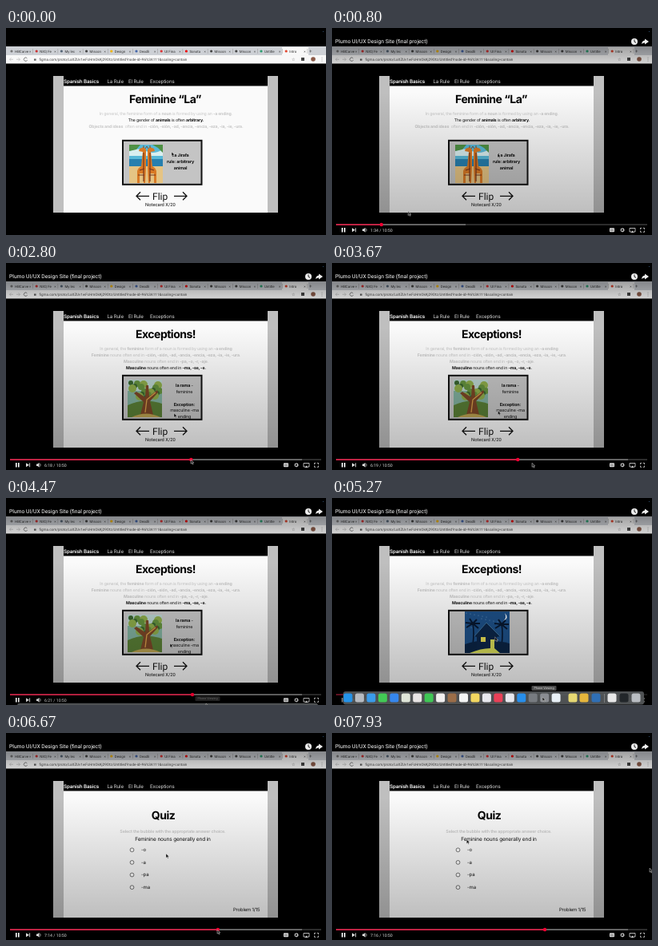
Recreate the animation shown at these times as an HTML page. Size 400 by 259 pixels, loop 8000 ms.

```html
<!DOCTYPE html>
<html lang="en">
<head>
<meta charset="utf-8">
<title>Design site walkthrough</title>
<style>
  html, body { margin: 0; width: 100%; height: 100%; overflow: hidden; background: #000; }
  svg { display: block; width: 100vw; height: 100vh; }
  text { font-family: Inter, sans-serif; text-rendering: geometricPrecision; white-space: pre; }
  .ui { font-family: Roboto, sans-serif; }
</style>
</head>
<body>
<svg id="stage" viewBox="0 0 400 259" preserveAspectRatio="none"></svg>
<script>
(() => {
const LOOP = 8000, DURATION = 650, BAR_X = 5, BAR_W = 389;

// ---- markup helpers ----
const rect = (x, y, w, h, fill, extra = '') =>
  `<rect x="${x}" y="${y}" width="${w}" height="${h}" fill="${fill}" ${extra}/>`;
const dot = (x, y, r, fill, extra = '') => `<circle cx="${x}" cy="${y}" r="${r}" fill="${fill}" ${extra}/>`;
const path = (d, fill, extra = '') => `<path d="${d}" fill="${fill}" ${extra}/>`;
const line = (d, color, width = 1) => path(d, 'none', `stroke="${color}" stroke-width="${width}"`);
const group = (id, body) => `<g id="${id}">${body}</g>`;
// *word* is set in bold
const text = (x, y, size, str, { fill = '#111', anchor = 'start', weight = 400, ls = -0.15, extra = '' } = {}) =>
  `<text x="${x}" y="${y}" font-size="${size}" fill="${fill}" text-anchor="${anchor}" font-weight="${weight}" letter-spacing="${ls}" ${extra}>` +
  str.replace(/&/g, '&amp;').replace(/\*(.+?)\*/g, '<tspan font-weight="700">$1</tspan>') + '</text>';
const mid = (x, y, size, str, opt = {}) => text(x, y, size, str, { anchor: 'middle', ...opt });
const ui = (x, y, size, str, opt = {}) => text(x, y, size, str, { ls: 0, extra: 'class="ui"', ...opt });

// ---- browser window ----
function browser() {
  const tabs = ['HBCarve', 'NXQ Fe', 'My lec', 'Miscon', 'Design', 'Deadli', 'UI Fina', 'Sonata', 'Miscon', 'Miscon', 'Untitle', 'Intro'];
  const icons = ['#777', '#c33', '#567', '#444', '#f0b400', '#46a', '#d33', '#e00', '#444', '#444', '#2a9d6f', '#e2452d'];
  let out = rect(0, 23, 400, 11, '#cdd0d5') + rect(0, 34, 400, 10.5, '#f8f8f8') + rect(345, 24, 33, 10.5, '#f8f8f8');
  tabs.forEach((name, i) => {
    const x = 6 + i * 31.2;
    out += dot(x + 1, 29, 1.6, icons[i]) + ui(x + 5, 30.7, 4.4, name, { fill: '#333' }) +
      ui(x + 23, 30.7, 4.4, '×', { fill: '#444' }) + rect(x + 27.5, 26, 0.4, 6, '#888');
  });
  out += ui(379, 31.3, 6, '+', { fill: '#444' });
  out += line('M9 39.3H4.5M6.5 37.3L4.5 39.3L6.5 41.3', '#bbb', 0.7) + line('M13 39.3H17.5M15.5 37.3L17.5 39.3L15.5 41.3', '#bbb', 0.7);
  out += line('M26.4 38A2.2 2.2 0 1 0 26.6 40', '#555', 0.7) + rect(35, 38.5, 2.6, 2.3, '#666');
  out += ui(41.5, 40.9, 4.55, 'figma.com/proto/LaXZUv1wFcHmOkKj29Otz/Untitled?node-id=96%3A111&scaling=contain', { fill: '#444' });
  return out + ui(357, 41, 5, '☆', { fill: '#555' }) + rect(369, 37, 4, 4, '#444') + dot(384, 39, 2.8, '#8a5a48') + ui(392, 41.2, 6, '⋮', { fill: '#555' });
}

// ---- slides ----
const GREY = '#c6c6c6';
const slide = () => rect(59, 60, 281, 171, '#bfbfbf') + rect(72, 60, 255, 13, '#000') + rect(72, 72.5, 255, 158.5, '#fafafa') +
  text(72, 68.6, 6.3, 'Spanish Basics', { fill: '#fff', weight: 600 }) +
  [[126.5, 'La Rule'], [153, 'El Rule'], [180, 'Exceptions']].map(([x, s]) => text(x, 69.2, 6.2, s, { fill: '#ddd' })).join('');
const heading = (x, y, str) => mid(x, y, 14, str, { weight: 700, ls: -0.5, fill: '#000' });
const body = (y, str, fill = GREY) => mid(200, y, 5.2, str, { fill });

const cardFrame = () => rect(146, 140.8, 98.5, 55, '#c4c4c4', 'stroke="#111" stroke-width="2"') +
  line('M179 210.3H163M168 205.3L163 210.3L168 215.3', '#111', 1.3) + line('M210 210.3H226M221 205.3L226 210.3L221 215.3', '#111', 1.3) +
  ui(183, 215, 12, 'Flip') + ui(193, 222.6, 5.8, 'Notecard X/20', { anchor: 'middle' });

const giraffe = (x, dir) => `<g transform="translate(${x} 146) scale(${dir} 1)">` +
  path('M-5 48V33Q-4 29 0 27L2 9L-3 8L-2 5L3 3L6 6L6 29L5 48H3V36H-2V48Z', '#d87925') +
  line('M3 10V46M-2 32L4 30M-4 38H4', '#74351d', 1.2) + line('M3 4V1M5 5L7 2', '#74351d', 0.8) + '</g>';
const giraffes = () => rect(154, 146, 42, 48, '#58b9d8') + path('M154 154Q165 149 175 154T196 152V160H154Z', '#d9eff0') +
  rect(154, 164, 42, 10, '#277fae') + rect(154, 173, 42, 21, '#e5c484') +
  path('M154 146H168L163 152L154 154ZM183 146H196V156L190 150Z', '#4f9144') + giraffe(169, 1) + giraffe(183, -1);

const tree = () => {
  let out = rect(152, 146, 43, 47, '#7fae9c') + rect(152, 146, 43, 14, '#b8d1cd') + path('M152 178Q172 168 195 176V193H152Z', '#587d35');
  for (let i = 0; i < 18; i++)
    out += dot(156 + (i * 17 % 37), 150 + (i * 11 % 19), 3 + i % 3, ['#38642f', '#63903d', '#8caa49'][i % 3], 'clip-path="url(#treeClip)"');
  return out + path('M168 190L172 174L160 163L163 161L174 168L175 153H178L179 167L189 159L190 162L180 173L184 190Z', '#7a4526') +
    line('M174 187L176 171L187 162', '#d6a04a', 1.3) + path('M157 193Q175 184 193 193Z', '#b9a04f');
};

const palm = (x, y) => line(`M${x} ${y}Q${x + 2} ${y + 10} ${x} ${y + 27}`, '#07172f', 1.6) +
  line(`M${x} ${y}l-8 5M${x} ${y}l-9 -1M${x} ${y}l-4 -6M${x} ${y}l5 -5M${x} ${y}l9 0M${x} ${y}l7 6`, '#07172f', 2);
const house = () => {
  let out = rect(166, 142, 56, 52, '#1d4f86');
  for (let i = 0; i < 16; i++) out += dot(168 + (i * 19 % 52), 144 + (i * 7 % 20), 0.4, '#b7d9ef');
  return out + path('M216 144Q222 150 214 154Q219 150 216 144Z', '#fff') + palm(176, 157) + palm(212, 158) +
    path('M166 183Q190 174 222 182V194H166Z', '#0b2444') +
    path('M178 173L193 156L210 173L206 174V190H181V174Z', '#0c2547') + line('M178 173L193 156L210 173', '#4f86a8', 0.7) +
    rect(186, 174, 6, 6, '#e9de55') + path('M198 177H203V188L210 194H172Q186 188 198 188Z', '#d8dc58');
};

const feminine = () => slide() + heading(199, 94, 'Feminine “La”') +
  body(109, 'In general, the feminine form of a *noun* is formed by using an *-a ending*.') +
  body(116.7, 'The gender of *animals* is often *arbitrary.*', '#111') +
  body(124.8, '*Objects and ideas*  often end in *-ción, -sión, -ad, -ancia, -encia, -eza, -ia, -ie, -ura.*') + cardFrame();
const exceptions = () => slide() + heading(199.5, 94, 'Exceptions!') +
  body(109, 'In general, the *feminine* form of a noun is formed by using an *-a ending*') +
  body(116.7, '*Feminine* nouns often end in *-ción, -sión, -ad, -ancia, -encia, -eza, -ia, -ie, -ura*.') +
  body(124.8, '*Masculine* nouns often end in *-pa, -o, -r, -aje*.') +
  body(132.8, '*Masculine* nouns often end in *-ma, -se, -e.*', '#111') + cardFrame();
const quiz = () => slide() + heading(196.5, 107.5, 'Quiz') +
  mid(208.5, 125.2, 5.4, 'Select the bubble with the appropriate answer choice.', { fill: GREY, weight: 600 }) +
  mid(208.5, 134.6, 6.5, 'Feminine nouns generally end in') +
  ['-o', '-a', '-pa', '-ma'].map((s, i) => dot(157.5, 146.3 + i * 15.6, 2.4, '#fff', 'stroke="#222" stroke-width=".6"') +
    text(169, 148 + i * 15.6, 6, s)).join('') + text(284, 223, 5.9, 'Problem 1/15');

const lines = (x, rows) => rows.map(([y, s]) => mid(x, y, 5.4, s)).join('');
const giraffeCard = () => giraffes() + lines(218, [[161, '*La Jirafa*'], [169, '*rule: arbitrary*'], [177, '*animal*']]);
const sexCard = () => lines(195, [[165.5, 'Some animals have separate'], [173, 'names for each sex.']]);
const treeCard = () => tree() + lines(223, [[155, '*la rama* -'], [163, 'feminine'], [178.5, '*Exception:*'], [186, 'masculine -ma'], [194, 'ending']]);

// ---- player and dock ----
const header = () => rect(0, 13, 400, 47, 'url(#shadeTop)') + rect(0, 80, 400, 151, 'url(#shadeLow)') +
  ui(4, 19.4, 6.75, 'Plumo UI/UX Design Site (final project)', { fill: '#fff' }) +
  dot(378, 17, 4, '#eee') + line('M378 14.4V17.2L380 18.4', '#111', 0.9) +
  path('M391 13.5L396 17L391 20.5V18.4Q388.5 18.3 387 20Q387.5 15.8 391 15.5Z', '#eee');
const footer = () => rect(BAR_X, 245.4, BAR_W, 1.2, '#4a4a4a') + rect(BAR_X, 245.4, 0, 1.2, '#888', 'id="buffer"') +
  rect(BAR_X, 245.4, 0, 1.3, '#f00032', 'id="played"') + dot(0, 246, 2.2, '#f00032', 'id="knob"') +
  rect(12, 250, 1.6, 5.5, '#fff') + rect(15, 250, 1.6, 5.5, '#fff') + path('M25 250.3L29 252.8L25 255.3Z', '#ddd') + rect(29.2, 250.3, 0.9, 5, '#ddd') +
  path('M38 251.5H39.5L41.5 249.8V255.8L39.5 254.1H38Z', '#ddd') + line('M42.5 251Q44 252.8 42.5 254.6', '#ddd', 0.7) +
  ui(48, 254.8, 5.2, '', { fill: '#ddd', extra: 'id="clock" class="ui"' }) +
  rect(347, 250.3, 6, 5, '#ddd', 'rx=".8"') + line('M349.8 252H348.5V253.7H349.8M352 252H350.8V253.7H352', '#222', 0.5) +
  dot(363, 252.8, 1.8, 'none', 'stroke="#ddd" stroke-width="1.5" stroke-dasharray="1.1 .3"') +
  line('M372 255V250.5H379V255H377M374 255H372', '#ddd', 0.8) + path('M373.5 256L375.5 253.5L377.5 256Z', '#ddd') +
  line('M385.5 252V250.3H387.2M388.8 250.3H390.5V252M390.5 253.6V255.3H388.8M387.2 255.3H385.5V253.6', '#ddd', 0.8);

const preview = () => mid(43, -3.5, 4, 'Pull up for precise seeking', { fill: '#777' }) +
  rect(0, 0, 85, 48, '#000') +
  `<g clip-path="url(#thumbClip)"><g transform="scale(.2125) translate(0 -17)"><use href="#browser"/>` +
  `<use id="thumbExceptions" href="#exceptions"/><use id="thumbQuiz" href="#quiz"/></g></g>` +
  rect(0, 0, 85, 48, 'none', 'rx="1.5" stroke="#ddd" stroke-width="1.2"') +
  ui(42.5, 55.2, 5.2, '', { fill: '#fff', anchor: 'middle', extra: 'id="hoverTime" class="ui"' });

const dock = () => {
  const colors = ['#2492e8', '#b6bac0', '#3a9bea', '#42ca55', '#3687ee', '#dfe5d8', '#e8e4e4', '#3fc655', '#f0eeee', '#9b6d48', '#f4f4f4', '#f2d660',
    '#e8e8ee', '#e94057', '#e8e8ee', '#278eea', '#777b80', '#8a8d92', '#e8f0f6'];
  const icon = (x, c) => rect(x - 5.5, 244.5, 11, 11, c, 'rx="2.5"');
  return rect(14, 242, 376, 16.5, '#55585b', 'rx="3" fill-opacity=".92"') +
    colors.map((c, i) => icon(20 + i * 14.45, c)).join('') +
    [[301, '#e6d873'], [315, '#e6b63c'], [330, '#2f6fb5'], [350, '#e8e8e8'], [365, '#22262a'], [380, '#b9bdc2']].map(([x, c]) => icon(x, c)).join('') +
    rect(340, 245, 0.6, 11, '#999');
};
const tooltip = () => rect(-15.5, 235, 31, 6, '#4b4b4b', 'rx="1"') + ui(0, 239.4, 3.8, 'Phone Viewing', { fill: '#ddd', anchor: 'middle' });
const ARROW = 'M0 0V5.2L1.3 4.1L2.2 6L3.1 5.6L2.2 3.8H3.9Z';

const gradient = (id, a, b) => `<linearGradient id="${id}" x2="0" y2="1"><stop stop-opacity="${a}"/><stop offset="1" stop-opacity="${b}"/></linearGradient>`;
document.getElementById('stage').innerHTML =
  `<defs>${gradient('shadeTop', 0.45, 0)}${gradient('shadeLow', 0, 0.24)}` +
  `<clipPath id="thumbClip"><rect width="85" height="48"/></clipPath><clipPath id="treeClip">${rect(152, 146, 43, 47, '#000')}</clipPath>` +
  `${group('exceptions', exceptions() + treeCard())}${group('quiz', quiz())}</defs>` +
  rect(0, 0, 400, 259, '#000') + dot(396.5, 4.5, 0.6, '#357') + group('browser', browser()) +
  group('pageGiraffe', feminine() + giraffeCard()) + group('pageSex', feminine() + sexCard()) +
  group('pageTree', '<use href="#exceptions"/>') + group('pageHouse', exceptions() + house()) +
  group('pageQuiz', '<use href="#quiz"/>') +
  group('pointer', path(ARROW, '#111', 'stroke="#fff" stroke-width=".4"')) +
  group('header', header()) + group('footer', footer()) + group('preview', preview()) + group('dock', dock()) + group('tooltip', tooltip()) +
  group('mouse', path(ARROW, '#222', 'stroke="#ccc" stroke-width=".5"'));

// ---- timeline ----
const el = Object.fromEntries([...document.querySelectorAll('[id]')].map(e => [e.id, e]));
const set = (id, attrs) => { for (const k in attrs) el[id].setAttribute(k, attrs[k]); };
const show = (id, on) => set(id, { display: on ? 'inline' : 'none' });
const move = (id, x, y) => set(id, { transform: `translate(${x} ${y})` });
const ramp = (t, a, b) => { const k = Math.min(1, Math.max(0, (t - a) / (b - a))); return k * k * (3 - 2 * k); };
const stamp = s => `${Math.floor(s / 60)}:${String(Math.floor(s % 60)).padStart(2, '0')}`;
function along(keys, t) {
  const i = Math.max(1, keys.findIndex(k => k[0] >= t));
  const [a, b] = [keys[i - 1], keys[i]], k = ramp(t, a[0], b[0]);
  return [a[1] + (b[1] - a[1]) * k, a[2] + (b[2] - a[2]) * k];
}

const SEEK_1 = 2200, SEEK_2 = 6300;
const pages = [['pageGiraffe', 0], ['pageSex', 900], ['pageTree', SEEK_1], ['pageHouse', 4750], ['pageQuiz', SEEK_2]];
const pointerKeys = [[0, 207, 155], [900, 207, 157], [SEEK_1, 210, 188], [2900, 210, 188], [4400, 205, 182], [4750, 205, 182],
  [SEEK_2, 200, 151], [7000, 200, 151], [7800, 169, 134], [LOOP, 168, 133]];
const mouseKeys = [[0, 60, 190], [450, 60, 190], [1000, 110, 246], [1500, 228, 245], [2800, 231, 246], [3600, 250, 250],
  [4300, 250, 257], [4500, 250, 257], [5270, 263, 249], [5700, 262, 246], [6200, 264, 246], [7000, 264, 246], [7700, 397, 169], [LOOP, 397, 169]];

function draw(t) {
  pages.forEach(([id, from], i) => show(id, t >= from && t < (pages[i + 1]?.[1] ?? LOOP)));
  const now = t < SEEK_1 ? 96.2 + (t - 1600) / 620 : t < SEEK_2 ? 378.2 + (t - 2800) / 590 : 434.2 + (t - 6670) / 640;
  const played = BAR_W * now / DURATION, [mx, my] = along(mouseKeys, t);
  const dockUp = ramp(t, 4310, 5000) - ramp(t, 5500, 5700);
  const controls = ramp(t, 400, 550);

  set('header', { opacity: controls });
  set('footer', { opacity: controls * (1 - 0.5 * dockUp) });
  set('played', { width: played });
  set('buffer', { width: (t < SEEK_1 ? 167 : 370) - BAR_X });
  set('knob', { cx: BAR_X + played });
  el.clock.textContent = `${stamp(now)} / ${stamp(DURATION)}`;

  const hoverX = Math.min(mx, t < SEEK_1 ? 227.5 : 265);
  show('preview', (t > 1000 && t < SEEK_1) || (t > 5750 && t < SEEK_2));
  move('preview', hoverX - 42.5, 187);
  el.hoverTime.textContent = stamp((hoverX - BAR_X) / BAR_W * DURATION);
  show('thumbExceptions', t < SEEK_1);
  show('thumbQuiz', t >= SEEK_1);

  move('dock', 0, 17 * (1 - dockUp));
  show('dock', dockUp > 0);
  move('tooltip', mx + 2, 15 * (1 - dockUp));
  set('tooltip', { opacity: dockUp > 0 ? 0.35 + 0.65 * dockUp : 0 });

  move('pointer', ...along(pointerKeys, t));
  show('pointer', t < 900 || t > SEEK_1);
  move('mouse', mx, my);
  show('mouse', t > 400);
}

function tick(now) {
  draw(now % LOOP);
  requestAnimationFrame(tick);
}
draw(0);
requestAnimationFrame(tick);
})();
</script>
</body>
</html>
```
